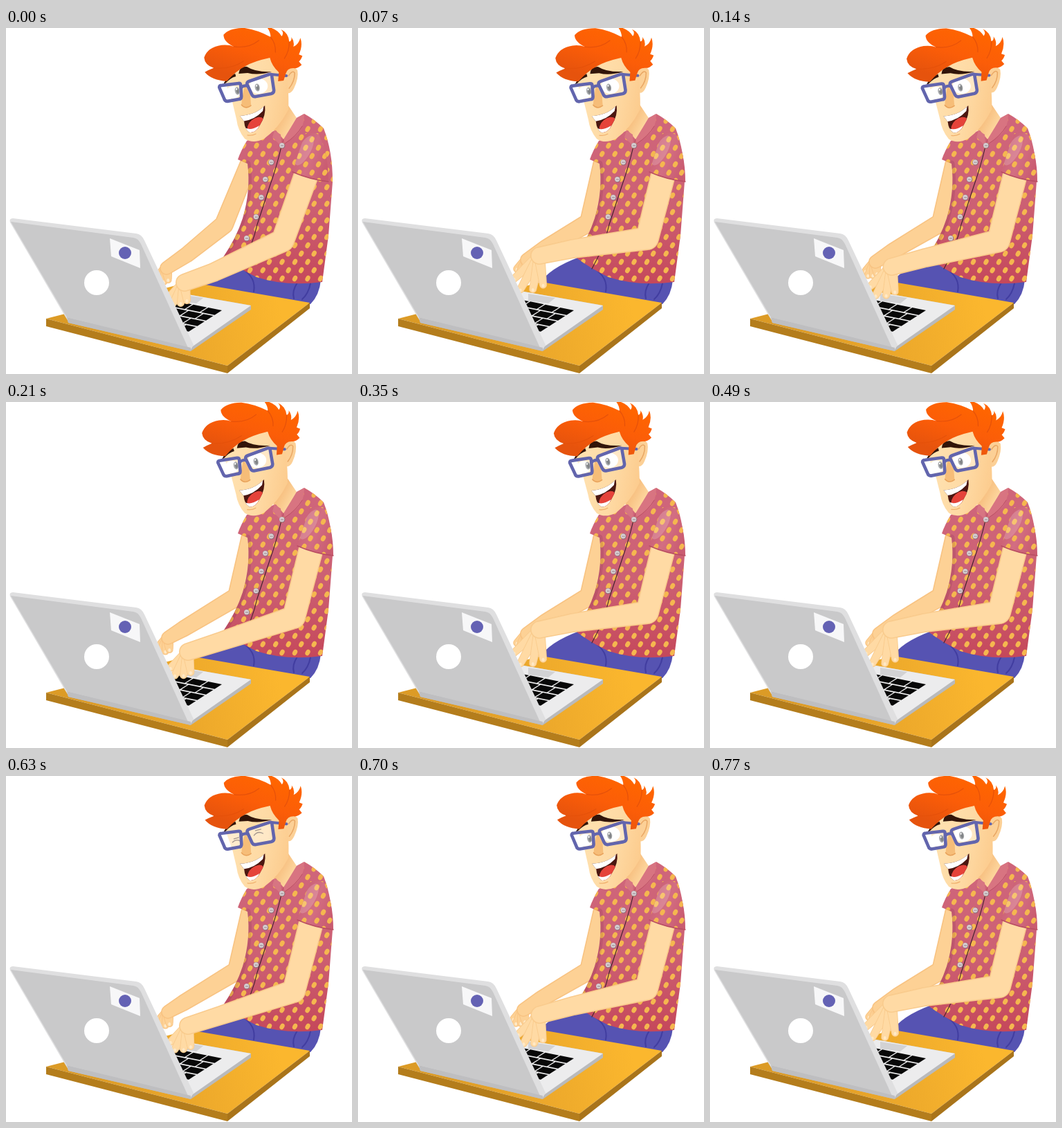
An HTML page with a canvas for the animation above (0.84 s loop, 500x500 px).

```html
<!DOCTYPE html>
<html lang="en">
<head>
<meta charset="utf-8">
<title>Typing at the laptop</title>
<style>
html, body { margin: 0; width: 100%; height: 100%; overflow: hidden; background: #fff; }
canvas { display: block; }
</style>
</head>
<body>
<canvas id="stage" width="500" height="500"></canvas>
<script>
const ctx = document.getElementById('stage').getContext('2d');
const STEP = 70, STEPS = 12;

const asPath = shape => typeof shape === 'string' ? new Path2D(shape) : shape;

function fill(shape, color) {
  ctx.fillStyle = color;
  ctx.fill(asPath(shape));
}

function line(shape, color, width = 1) {
  ctx.strokeStyle = color;
  ctx.lineWidth = width;
  ctx.stroke(asPath(shape));
}

function oval(x, y, rx, ry, color, turn = 0) {
  ctx.beginPath();
  ctx.ellipse(x, y, rx, ry, turn, 0, 7);
  ctx.fillStyle = color;
  ctx.fill();
}

function blend(x0, y0, x1, y1, ...colors) {
  const g = ctx.createLinearGradient(x0, y0, x1, y1);
  colors.forEach((c, i) => g.addColorStop(i / (colors.length - 1), c));
  return g;
}

function clipped(shape, draw) {
  ctx.save();
  ctx.clip(asPath(shape));
  draw();
  ctx.restore();
}

const mix = (a, b, k) => Array.isArray(a) ? a.map((v, i) => mix(v, b[i], k)) : a + (b - a) * k;

function bezier(points, t) {
  while (points.length > 1) points = points.slice(1).map((p, i) => mix(points[i], p, t));
  return points[0];
}

// Each arm: shoulder, elbow, wrist, knuckles.
const lifted = {
  far: [[352, 198], [334, 281], [272, 317], [244, 335]],
  near: [[441, 212], [418, 304], [310, 319], [262, 329]],
  reach: 56
};
const pressed = {
  far: [[352, 198], [334, 281], [256, 328], [234, 341]],
  near: [[441, 212], [416, 311], [313, 345], [263, 361]],
  reach: 39
};
const low = {
  far: [[350, 198], [315, 284], [262, 327], [232, 347]],
  near: [[434, 212], [400, 307], [300, 353], [258, 368]],
  reach: 34
};
const halfway = {
  far: mix(lifted.far, pressed.far, 0.5),
  near: mix(lifted.near, pressed.near, 0.5),
  reach: mix(lifted.reach, pressed.reach, 0.5)
};
const poses = [low, lifted, halfway, pressed, halfway, lifted];

const shirt = new Path2D('M390 148 Q366 155 348 163 Q339 178 335 190 L349 196 Q354 235 342 275 Q333 303 314 331 Q340 350 362 360 Q405 374 457 367 L466 300 L472 222 Q472 178 459 145 Q446 132 431 124 L420 130 L402 162Z');
const sleeve = new Path2D('M440 152 Q430 178 421 208 Q446 219 473 222 Q473 180 458 152Z');

// Tapered round limb through the joints.
function limb(joints, radii, inset) {
  const path = new Path2D();
  joints.forEach(([x, y], i) => {
    const r = radii[i] - inset;
    path.moveTo(x + r, y);
    path.arc(x, y, r, 0, Math.PI * 2);
    if (!i) return;
    const [px, py] = joints[i - 1], pr = radii[i - 1] - inset;
    const a = Math.atan2(y - py, x - px);
    const lean = Math.acos((pr - r) / Math.hypot(x - px, y - py));
    path.moveTo(px + pr * Math.cos(a - lean), py + pr * Math.sin(a - lean));
    path.lineTo(x + r * Math.cos(a - lean), y + r * Math.sin(a - lean));
    path.lineTo(x + r * Math.cos(a + lean), y + r * Math.sin(a + lean));
    path.lineTo(px + pr * Math.cos(a + lean), py + pr * Math.sin(a + lean));
    path.closePath();
  });
  return path;
}

function drawArm(joints, radii, reach, skin, edge) {
  const [x, y] = joints[3];
  for (let i = 0; i < 4; i++) {
    const angle = 2.4 - i * 0.32, length = reach * (1 - 0.12 * Math.abs(i - 1));
    const tip = [x + length * Math.cos(angle), y + length * Math.sin(angle)];
    const finger = [mix([x, y], tip, 0.1), tip];
    fill(limb(finger, [8, 5.5], 0), edge);
    fill(limb(finger, [8, 5.5], 0.9), skin);
    oval(tip[0], tip[1] + 1, 2, 2.5, '#ffe9c6');
  }
  fill(limb(joints, radii, 0), edge);
  fill(limb(joints, radii, 1.6), skin);
}

function dots(shiftX, shiftY) {
  for (let row = 0; row < 21; row++)
    for (let col = 0; col < 9; col++)
      oval(325 + shiftX + col * 18.5 + (row % 2) * 9.2, 122 + shiftY + row * 12, 3.3, 4.5, '#f5b74f', 0.5);
}

function drawDesk() {
  fill('M58 420 L265 367 L439 397 L320 488Z', blend(120, 450, 390, 380, '#dc9b26', '#eca82b', '#fbb72e'));
  fill('M58 420 L320 488 V499 L58 431Z', '#b47d1c');
  fill('M320 488 L439 397 V405 L320 499Z', '#a9741a');
}

function drawKeyboard() {
  fill('M88 417 L240 381 L354 401 V407 L267 467 L90 426Z', '#b9babc');
  fill('M92 416 L240 381 L354 401 L267 462Z', '#ececed');
  fill('M246 384 L285 390 L275 398 L246 394Z', '#d2d2d4');
  const key = (u, v) => `${312 - 47 * u - 50 * v} ${408 - 9.5 * u + 32 * v}`;
  for (let row = 0; row < 4; row++)
    for (let col = 0; col < 4; col++) {
      const u = col * 0.46 - (row % 2) * 0.12, v = row * 0.25;
      const u0 = Math.max(0, u), u1 = u + 0.42, v1 = v + 0.21;
      fill(`M${key(u0, v)} L${key(u1, v)} L${key(u1, v1)} L${key(u0, v1)}Z`, '#080808');
    }
}

function drawScreen() {
  fill('M10 275 L188 297 Q196 298 200 307 L271 458 L267 465 L90 424 L85 416 L6 281 Q4 275 10 275Z', '#dfdfe0');
  fill('M7 280 L184 303 Q191 304 195 312 L263 462 L88 418Z', '#c9c9ca');
  fill('M88 418 L267 462 V467 L90 426Z', '#bebec0');
  fill('M150 304 L193 321 L194 347 L152 330Z', '#f7f7f8');
  oval(172, 325, 9, 9, '#6462b4');
  oval(131, 368, 18, 18, '#fff');
}

function drawTrousers() {
  fill('M262 370 Q276 347 320 331 L365 350 L455 364 Q453 386 440 399Z', '#5653b2');
  line('M340 347 Q362 360 358 381 M421 368 Q413 380 416 391 M440 369 Q437 384 428 392', '#413da0', 2);
}

function drawButtons() {
  line('M398 171 Q391 201 381 229 L363 284 Q356 316 338 348', '#40202b', 1.1);
  const placket = [[399, 170], [365, 210], [378, 250], [348, 304]];
  for (let i = 0; i <= 5; i++) {
    const [x, y] = bezier(placket, i / 5);
    oval(x, y, 4.3, 4.3, '#8f6875');
    oval(x - 0.3, y - 0.3, 3.6, 3.6, '#d6cdd0');
    for (const side of [-1, 1]) oval(x + side, y, 0.7, 0.7, '#776a72');
  }
}

function drawShirt() {
  fill('M386 150 L398 100 L408 112 L420 130 L402 163Z', blend(390, 130, 418, 145, '#f5b877', '#ffdca5'));
  fill(shirt, blend(385, 150, 400, 370, '#cf657a', '#cc6073', '#c5485b'));
  clipped(shirt, () => {
    dots(0, 0);
    line('M349 196 Q354 235 342 275 Q333 303 314 331', 'rgba(94,23,64,.14)', 9);
  });
  fill('M388 148 L397 154 L398 171 L385 158Z', '#d77582');
  fill('M420 130 L431 124 Q431 146 418 156 L403 167 L401 161Z', '#d87481');
  line('M401 161 L398 171 M428 142 Q420 156 403 167', '#b94e63');
  drawButtons();
}

function drawSleeve(shift) {
  ctx.save();
  ctx.translate(shift, 0);
  fill(sleeve, blend(420, 180, 472, 200, '#c95e72', '#d36e82', '#c95b70'));
  clipped(sleeve, () => {
    dots(4, 3);
    oval(438, 177, 9, 24, 'rgba(255,255,255,.18)', 0.5);
  });
  line('M421 208 Q446 219 473 222', '#b84d62', 1.4);
  ctx.restore();
}

function drawEyes(closed) {
  if (closed) {
    line('M327 96 Q332 91 338 94 M358 86 Q363 79 371 83 M329 91 L336 89 M360 79 L368 77', '#6b5548', 1.3);
    return;
  }
  oval(328, 93, 10, 9, '#fff');
  oval(365, 84, 13, 11, '#fff');
  for (const [x, y] of [[334, 91], [363, 86]]) {
    oval(x, y, 3.5, 5.6, '#76797d', -0.2);
    oval(x + 0.5, y, 2, 3.8, '#34383d', -0.2);
    oval(x - 1, y - 2.5, 1.1, 1.3, '#fff');
  }
}

function drawMouth() {
  const mouth = 'M338 127 Q360 126 374 112 Q376 126 367 140 Q361 152 352 151 Q345 147 344 135Z';
  fill(mouth, '#4b1711');
  clipped(mouth, () => {
    oval(361, 140, 14, 9, '#e5433a', -0.7);
    fill('M336 125 Q358 125 373 110 L371 120 Q359 133 342 135Z', '#fff');
    fill('M344 143 Q352 150 366 141 L360 154 H346Z', '#fff');
  });
  line('M349 155 Q356 156 361 153', '#f0b16d', 1.3);
}

function drawGlasses() {
  const frame = '#6265ad';
  fill('M309 85 L338 81 L339 101 L318 104Z M349 79 L383 68 L386 92 L358 98Z', 'rgba(255,255,255,.38)');
  line('M308 86 Q308 83 312 83 L336 80 Q339 80 339 83 L340 99 Q340 103 336 103 L320 106 Q316 106 315 102Z', frame, 4.6);
  line('M348 81 Q348 78 351 77 L380 67 Q384 66 384 70 L387 90 Q387 94 383 95 L361 99 Q357 100 355 96Z', frame, 4.6);
  line('M339 87 Q343 82 349 84 M383 67 L405 69', frame, 4);
}

function drawFace(closed) {
  fill('M403 62 Q412 50 421 61 Q423 72 416 87 Q411 98 402 92Z', '#fcd096');
  line('M408 69 Q414 60 417 65 Q417 77 409 87', '#e9a764', 1.5);
  fill('M316 77 Q335 42 382 38 L404 66 Q409 84 408 118 Q394 145 373 160 Q357 168 345 160 Q335 148 333 132 L327 107Z',
    blend(328, 110, 408, 125, '#ffe0ae', '#fedaa4', '#fccb8d'));
  fill('M345 82 Q341 98 340 112 Q346 119 354 113 L353 97Z', '#f6bd78');
  line('M340 111 Q346 118 354 112', '#e7a15b', 1.3);
  drawEyes(closed);
  fill('M314 81 Q320 69 331 66 L332 70 Q324 72 317 80Z M336 66 Q337 55 348 56 Q360 64 384 63 Q364 69 349 65Z', '#321509');
  drawGlasses();
  drawMouth();
}

function drawHair() {
  fill('M319 77 Q297 76 287 64 Q292 61 300 58 Q287 54 286 43 Q291 28 311 25 Q322 24 329 27 Q314 20 314 10 Q322 0 344 0 Q364 3 382 13 Q382 5 376 -2 Q392 1 398 12 Q402 7 397 2 Q408 7 409 20 Q413 18 412 13 Q417 20 415 27 Q423 23 425 14 Q429 25 423 38 L428 40 Q426 46 423 48 L427 53 Q421 59 415 58 Q406 58 404 66 L401 76 L393 77 L394 64 Q384 55 381 43 Q358 48 346 55 Q332 62 319 77Z',
    blend(370, 0, 345, 75, '#ff6500', '#fb5d08', '#e6530d'));
  line('M300 58 Q325 60 343 48 M329 27 Q350 30 365 18 M382 13 Q390 23 389 35 M409 20 Q409 34 402 44', '#e5510a', 1.2);
}

function drawHead(step) {
  const sway = Math.cos((step - 10.3) / STEPS * Math.PI * 2);
  ctx.save();
  ctx.translate(370, 160);
  ctx.rotate((sway - 0.5) * 0.019);
  ctx.translate(-370, -160);
  drawFace(step === 9);
  drawHair();
  ctx.restore();
}

function draw(now) {
  const step = Math.floor(now % (STEP * STEPS) / STEP);
  const pose = poses[step % poses.length];
  ctx.fillStyle = '#fff';
  ctx.fillRect(0, 0, 500, 500);
  ctx.lineCap = ctx.lineJoin = 'round';
  drawTrousers();
  drawDesk();
  drawKeyboard();
  drawArm(pose.far, [13, 14, 12, 10], 22, '#fdd195', '#f8c382');
  drawShirt();
  drawHead(step);
  drawArm(pose.near, [18, 17, 14, 13], pose.reach, '#ffdaa4', '#f9cb8d');
  drawSleeve(pose.near[0][0] - lifted.near[0][0]);
  drawScreen();
  requestAnimationFrame(draw);
}
requestAnimationFrame(draw);
</script>
</body>
</html>
```
